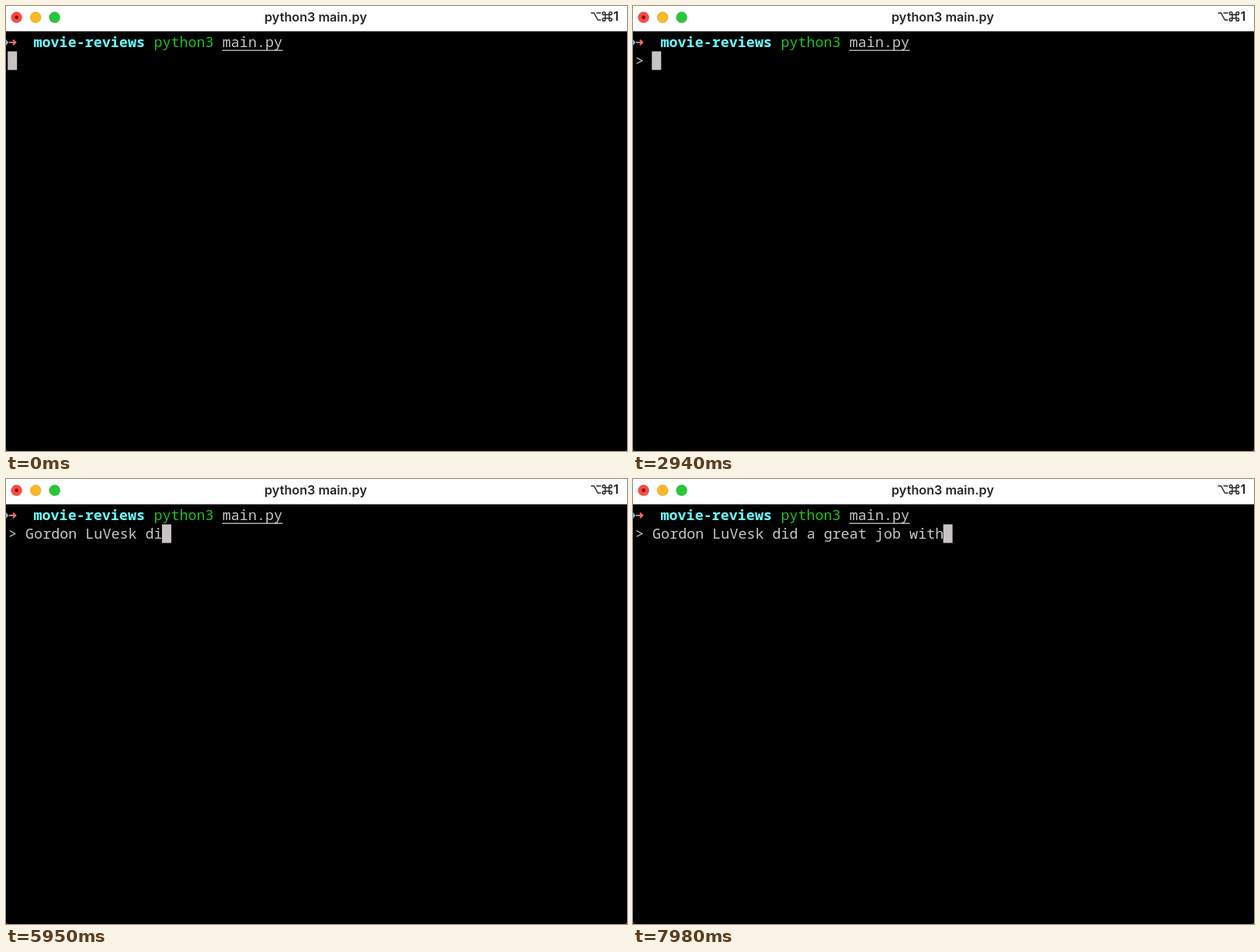
Recreate the animation shown at these times as an HTML page. Size 800x574 px, loop 8000 ms.

```html
<!DOCTYPE html>
<html lang="en">
<head>
<meta charset="utf-8">
<title>Terminal</title>
<style>
  html, body { margin: 0; width: 100%; height: 100%; overflow: hidden; background: #000; }
  svg { display: block; width: 100vw; height: 100vh; }
  .mono { font: 500 18.4px "Noto Sans Mono", "DejaVu Sans Mono", monospace; white-space: pre; fill: #c7c7c7; }
  .ui { font: 600 16.2px Inter, "Open Sans", sans-serif; fill: #262626; }
  .dir { font-weight: 700; fill: #68fdff; }
  .cmd { font-weight: 400; fill: #1dc121; }
  .file { font-weight: 400; }
  .lights circle { stroke: #0002; stroke-width: .8; }
  .keys { fill: none; stroke: #2b2b2b; stroke-width: 1.5; }
</style>
</head>
<body>
<svg viewBox="0 0 800 574">
  <rect width="800" height="574" fill="#2b4448"/>
  <path d="M0 32H800V570Q800 574 796 574H4Q0 574 0 570Z"/>
  <rect width="800" height="32.6" fill="#fff"/>

  <g class="lights">
    <circle cx="13.6" cy="14.7" r="7.1" fill="#fe4a42"/>
    <circle cx="38.2" cy="14.7" r="7.1" fill="#fcb827"/>
    <circle cx="62.7" cy="14.7" r="7.1" fill="#27c838"/>
  </g>
  <circle cx="13.6" cy="14.7" r="2.4" fill="#7c0b05"/>

  <text class="ui" x="399" y="19.7" text-anchor="middle">python3 main.py</text>
  <path class="keys" d="M753.5 9h4l5 9h4M760.5 9h6"/>
  <path class="keys" d="M772 9.5a1.8 1.8 0 1 0-1.8 1.8h8.6a1.8 1.8 0 1 0-1.8-1.8v8a1.8 1.8 0 1 0 1.8-1.8h-8.6a1.8 1.8 0 1 0 1.8 1.8z"/>
  <text class="ui" x="782.5" y="18.7">1</text>

  <path d="M0 43l3.5 4-3.5 4z" fill="#64b5e8"/>
  <path d="M4 47h8M9 43.8l3.3 3.2L9 50.2" fill="none" stroke="#ff6b62" stroke-width="2"/>
  <text class="mono dir" x="35.5" y="53">movie-reviews</text>
  <text class="mono cmd" x="190.4" y="53">python3</text>
  <text class="mono file" x="278.8" y="53">main.py</text>
  <rect x="278.5" y="56.6" width="78" height="1.3" fill="#c7c7c7"/>

  <text class="mono" id="input" x="3" y="76.8"></text>
  <rect id="cursor" y="58.5" width="12" height="24" fill="#c7c4c3"/>
</svg>
<script>
  const LOOP = 8000, COLUMN = 11.04;
  const PROMPT = '> ', PROMPT_AT = 2940;
  const REVIEW = 'Gordon LuVesk did a great job with';
  // Typing pace: [ms, characters typed], linear in between.
  const PACE = [[3360, 0], [4830, 9.4], [5950, 16.3], [7140, 28.4], [7980, 34]];
  const input = document.getElementById('input');
  const cursor = document.getElementById('cursor');

  function typedAt(t) {
    if (t <= PACE[0][0]) return 0;
    const next = PACE.findIndex(([at]) => t < at);
    if (next < 0) return REVIEW.length;
    const [[t0, n0], [t1, n1]] = PACE.slice(next - 1, next + 1);
    return Math.floor(n0 + (n1 - n0) * (t - t0) / (t1 - t0));
  }

  function draw(now) {
    const t = now % LOOP;
    const text = t < PROMPT_AT ? '' : PROMPT + REVIEW.slice(0, typedAt(t));
    input.textContent = text;
    cursor.setAttribute('x', 2.2 + text.length * COLUMN);
    requestAnimationFrame(draw);
  }
  draw(performance.now());
</script>
</body>
</html>
```
